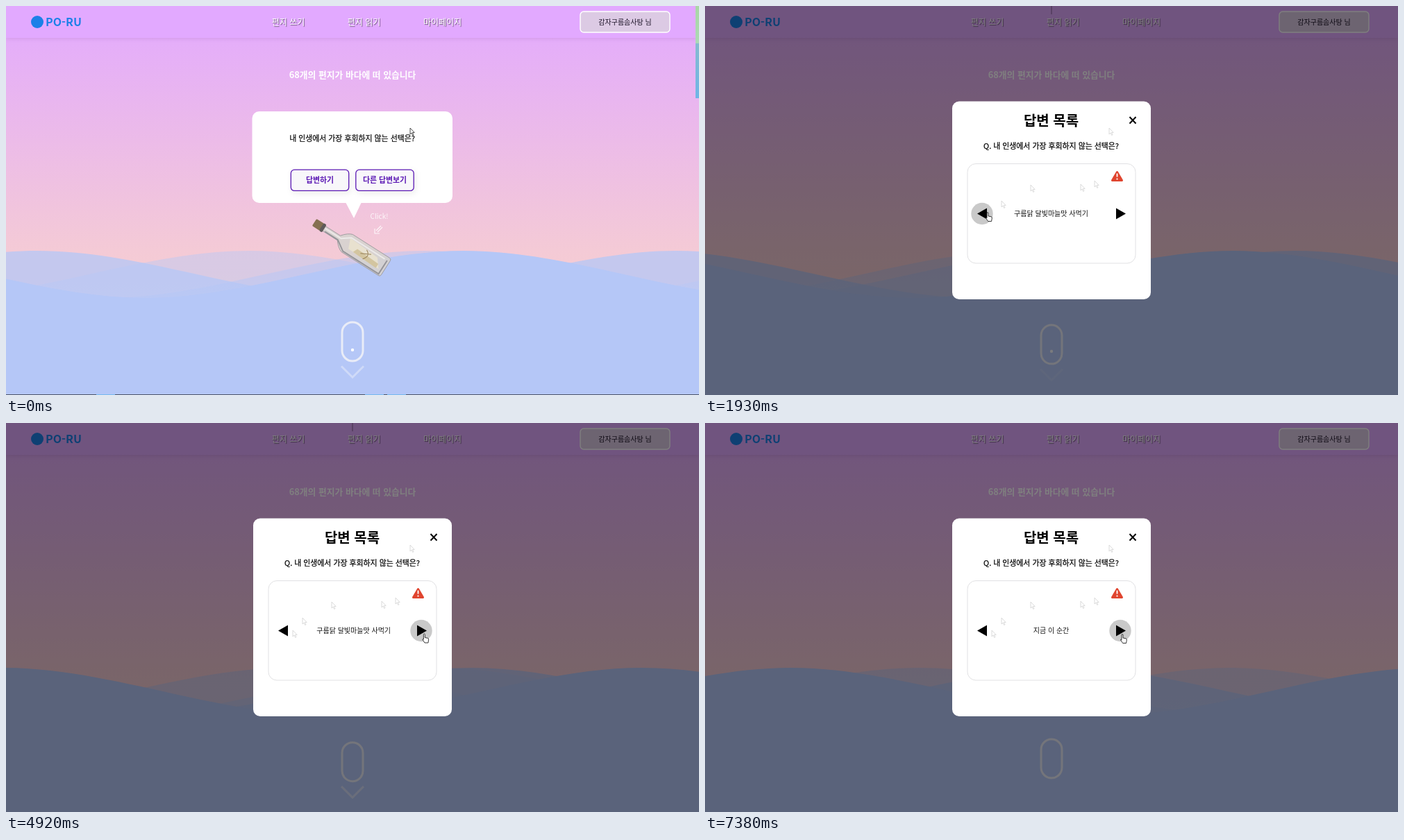
These frames come from a looping animation (998 by 561 pixels, 7440 ms). An HTML page:

```html
<!DOCTYPE html>
<html lang="ko">
<head>
<meta charset="utf-8">
<style>
html, body { margin: 0; width: 100%; height: 100%; overflow: hidden; background: #b5c7f7; }
svg { display: block; width: 100%; height: 100%; }
text { font: 500 10.9px "Noto Sans CJK KR", "Noto Sans CJK", "Noto Sans", sans-serif; text-anchor: middle; }
.nav { font-size: 12px; fill: #fff; text-shadow: 1px 1px 1px rgba(0,0,0,.55); }
.medium { stroke: #111; stroke-width: .25; }
.btn { fill: #f8f7fa; stroke: #5b18b4; stroke-width: 1.3; filter: drop-shadow(2px 3px 4px rgba(0,0,0,.08)); }
.btn.over { fill: #dcdcde; filter: drop-shadow(3px 4px 5px rgba(0,0,0,.22)); }
.label { fill: #5b18b4; font-weight: 700; }
.answer { font-size: 10px; fill: #111; }
.line { fill: none; stroke: #f3f3f7; stroke-width: 3; }
</style>
</head>
<body>
<svg viewBox="0 0 998 561" preserveAspectRatio="none">
  <defs>
    <linearGradient id="sky" x2="0" y2="1">
      <stop stop-color="#e2a9ff"/><stop offset=".82" stop-color="#f4cad6"/><stop offset="1" stop-color="#f6cfd0"/>
    </linearGradient>
    <linearGradient id="bar" x2="0" y2="1">
      <stop stop-color="#a9d6a6"/><stop offset=".4" stop-color="#acd9b6"/>
      <stop offset=".41" stop-color="#86bad0"/><stop offset="1" stop-color="#6fb5e6"/>
    </linearGradient>
    <path id="wave" d="M0 353c153 0 307 68 460 68s307-68 460-68 307 68 460 68 307-68 460-68 307 68 460 68 307-68 460-68V570H0z"/>
    <path id="arrow" d="M0 0v9l2-2 1.6 3.4 1.4-.6-1.6-3.3h2.8z" fill="#fff" stroke="#222" stroke-width=".8"/>
    <path id="hand" d="M-1 1q0-1.500 1-1.500t1 1.500v4l4 .8q1.500.3 1.300 2l-.7 4.700h-5l-3-4.600q-.5-1.200 1.400-.3z" fill="#fff" stroke="#222" stroke-width=".9"/>
  </defs>

  <rect width="998" height="430" fill="url(#sky)"/>
  <g id="waves" fill="#b5c7f7"></g>

  <rect width="998" height="46" fill="#e2a9ff" style="filter:drop-shadow(0 1px 3px rgba(70,0,90,.12))"/>
  <circle cx="45" cy="23" r="9" fill="#1c80e8"/>
  <text x="83" y="29" fill="#1c80e8" style="font-size:16px;font-weight:700">PO-RU</text>
  <text class="nav" x="406.500" y="27.500">편지 쓰기</text>
  <text class="nav" x="515.500" y="27.500">편지 읽기</text>
  <text class="nav" x="628.500" y="27.500">마이페이지</text>
  <rect x="827" y="8" width="129" height="30" rx="5" fill="#dccae4" stroke="#fff" stroke-width="1.400"/>
  <text x="891.500" y="27" fill="#1b1226" style="font-size:10px">감자구름솜사탕 님</text>
  <text x="499" y="103.500" fill="#fff" style="font-size:12.8px;font-weight:700">68개의 편지가 바다에 떠 있습니다</text>

  <g id="mouse">
    <rect class="line" x="484" y="456" width="30" height="56" rx="15" stroke-width="2.600" opacity=".85"/>
    <circle id="dot" cx="499" r="2.200" fill="#fff"/>
    <path id="chevron" class="line" d="M483 519.500l16 16 16-16"/>
  </g>

  <g id="home">
    <rect x="354.500" y="152" width="288.500" height="132" rx="10" fill="#fff"/>
    <path d="M489 283h23l-11 23z" fill="#fff"/>
    <text class="medium" x="498.500" y="195" fill="#111">내 인생에서 가장 후회하지 않는 선택은?</text>
    <rect class="btn" x="410.300" y="236.200" width="83.400" height="30.200" rx="5"/>
    <rect id="other" class="btn" x="503.800" y="236.200" width="83.400" height="30.200" rx="5"/>
    <text class="label" x="452" y="255">답변하기</text>
    <text class="label" x="545.500" y="255">다른 답변보기</text>
    <g id="bottle">
      <g transform="translate(444 312) rotate(32.500)">
        <path d="M14-4H42Q49-13 56-15H119Q122-15 122-12V12Q122 15 119 15H56Q49 13 42 4H14z" fill="#d6d3d0" fill-opacity=".9" stroke="#99979a" stroke-width=".8"/>
        <path d="M56-9L104-6 114 7 62 6z" fill="#e8e1cf"/>
        <path d="M73-1L110 1V8L70 6z" fill="#d3c5a0"/>
        <path d="M85-7q10 5 2 14m7-12l-14 7" fill="none" stroke="#967f55"/>
        <path d="M18-1H45L57-10H114" fill="none" stroke="#f3f2f2" stroke-width="2" opacity=".75"/>
        <path d="M20 3H42L57 13H118V-10" fill="none" stroke="#96959a" stroke-width="2"/>
        <rect x="0" y="-6" width="13" height="12" rx="1.500" fill="#857051"/>
        <rect x="12" y="-6.500" width="5" height="13" rx="2" fill="#5f5b5a"/>
      </g>
      <g id="click">
        <text x="537.500" y="307" fill="#fff" style="font-size:10px;font-weight:400">Click!</text>
        <path d="M540 317l-7 7m9-5l-7 7m-4-5v7h7" fill="none" stroke="#fff" stroke-width="1.100"/>
      </g>
    </g>
    <rect x="993" width="5" height="133" fill="url(#bar)"/>
  </g>
  <g id="edge">
    <path d="M0 560.500H998" stroke="#4d5568"/>
    <path d="M130 560.500h27m360 0h27m5 0h27" stroke="#76b9ee"/>
  </g>

  <g id="modal">
    <rect width="998" height="561" opacity=".5"/>
    <path id="tick" d="M499 0V12" stroke="#43304d"/>
    <rect x="356" y="137.500" width="286" height="285.500" rx="10" fill="#fff"/>
    <text x="498.500" y="173" style="font-size:20px;font-weight:700">답변 목록</text>
    <path d="M611.500 160l9 9.500m0-9.500l-9 9.500" stroke="#000" stroke-width="2"/>
    <text class="medium" x="498.500" y="206">Q. 내 인생에서 가장 후회하지 않는 선택은?</text>
    <rect x="378" y="227.500" width="242" height="143.500" rx="12" fill="none" stroke="#e1e1e3"/>
    <path d="M593.500 239.500l7 12h-14z" fill="#e0452f" stroke="#e0452f" stroke-width="3" stroke-linejoin="round"/>
    <path d="M593.500 241.500v5m0 2v2" stroke="#fff" stroke-width="1.800"/>
    <g id="ghosts"></g>
    <g fill="#c9c9c9">
      <circle class="halo" cx="399" cy="299.500" r="15.700"/>
      <circle class="halo" cx="598" cy="299.500" r="15.700"/>
    </g>
    <path d="M392 299.500l14-8v16zM606 299.500l-14-8v16z"/>
    <text class="answer" y="303">내한 콘서트</text>
    <text class="answer" y="303">구름닭 달빛마늘맛 사먹기</text>
    <text class="answer" y="303">지금 이 순간</text>
  </g>
  <use id="cursor"/>
</svg>
<script>
const LOOP = 7.44, STEPS = 112, PERIOD = 920, OPEN = 0.86;
const $ = id => document.getElementById(id);
const all = sel => [...document.querySelectorAll(sel)];
const clamp = (v, lo = 0, hi = 1) => Math.min(hi, Math.max(lo, v));
const mod = (v, n) => ((v % n) + n) % n;
const show = (el, on) => el.style.display = on ? '' : 'none';
const move = (el, x, y) => el.setAttribute('transform', `translate(${x} ${y})`);

function add(parent, href, opacity) {
  const el = document.createElementNS('http://www.w3.org/2000/svg', 'use');
  el.setAttribute('href', href);
  el.setAttribute('opacity', opacity);
  return $(parent).appendChild(el);
}

// crest position, speed in px/s, opacity
const waves = [[45, -60, .75], [350, 55, .45], [603, -40, .5], [660, 52, 1]]
  .map(([x, speed, alpha]) => ({ x, speed, el: add('waves', '#wave', alpha) }));

// time, x, y of the pointer
const route = [[0, 582, 176], [.1, 582, 176], [.5, 561, 252], [1, 561, 252], [1.3, 541, 257],
  [1.45, 469, 258], [1.6, 427, 281], [1.8, 407, 298], [3.3, 407, 298], [3.9, 609, 302],
  [4.5, 609, 302], [5, 601, 305], [LOOP, 601, 305]];

// faint pointer marks left behind
const ghosts = [[.1, 582, 176], [1.05, 561, 252], [1.35, 541, 257], [1.5, 469, 258], [1.65, 427, 281], [3.4, 413, 299]]
  .map(([at, x, y]) => {
    const el = add('ghosts', '#arrow', .2);
    move(el, x, y);
    return { at, el };
  });

// time, answer before, answer after
const slides = [[-9, 1, 1], [2.1, 1, 0], [4.35, 0, 1], [5.4, 1, 2]];
const answers = all('.answer'), halos = all('.halo');

function pointerAt(t) {
  const i = Math.max(1, route.findIndex(p => p[0] >= t));
  const [t0, x0, y0] = route[i - 1], [t1, x1, y1] = route[i];
  const k = clamp((t - t0) / (t1 - t0));
  return [x0 + (x1 - x0) * k, y0 + (y1 - y0) * k];
}

function place(el, x, opacity) {
  el.setAttribute('x', x);
  el.setAttribute('opacity', opacity);
}

function drawAnswers(t) {
  const [at, from, to] = slides.filter(s => s[0] <= t).pop();
  const dir = to - from, u = t - at, v = clamp((u - .1) / .6);
  answers.forEach(el => place(el, 498.5, 0));
  place(answers[from], 498.5 - dir * 400 * u, clamp(1 - u / .1));
  if (u >= .1) place(answers[to], 498.5 + dir * 195 * (1 - v) ** 3, clamp(v * 2.5));
}

function drawMouse(t) {
  const bob = 6 * Math.sin(Math.PI * t / 1.47) ** 2;
  move($('mouse'), 0, bob);
  show($('tick'), bob > .4);
  const fade = .45 + .5 * Math.cos(2 * Math.PI * (t / 1.4 - .74));
  $('chevron').setAttribute('opacity', clamp(fade, 0, .85));
  const u = mod(t / 2 + .5, 1) - .5;
  $('dot').setAttribute('cy', 496 + 57 * u);
  $('dot').setAttribute('opacity', clamp(u < 0 ? 1 + u / .28 : 1 - u / .15));
}

function draw(t) {
  const open = t > OPEN, [x, y] = pointerAt(t);
  waves.forEach(w => move(w.el, mod(w.x + w.speed * t, PERIOD) - PERIOD, 0));
  drawMouse(t);
  show($('home'), !open);
  show($('modal'), open);
  show($('edge'), t < .06);

  const lift = (1 - Math.cos(Math.PI * t / .8)) / 2;
  move($('bottle'), 0, -8.7 * lift);
  $('click').setAttribute('opacity', .85 - .25 * lift);

  const onButton = !open && x > 503 && x < 588 && y > 236 && y < 267;
  $('other').classList.toggle('over', onButton);
  let hand = onButton;
  halos.forEach(h => {
    const on = open && Math.hypot(x - h.cx.baseVal.value, y - 299.5) < 16;
    show(h, on);
    hand ||= on;
  });
  ghosts.forEach(g => show(g.el, t >= g.at));
  drawAnswers(t);
  $('cursor').setAttribute('href', hand ? '#hand' : '#arrow');
  move($('cursor'), x, y);
}

const start = performance.now();
function tick() {
  const phase = mod((performance.now() - start) / 1000, LOOP) / LOOP;
  draw(Math.floor(phase * STEPS) / STEPS * LOOP);
  requestAnimationFrame(tick);
}
tick();
</script>
</body>
</html>
```
